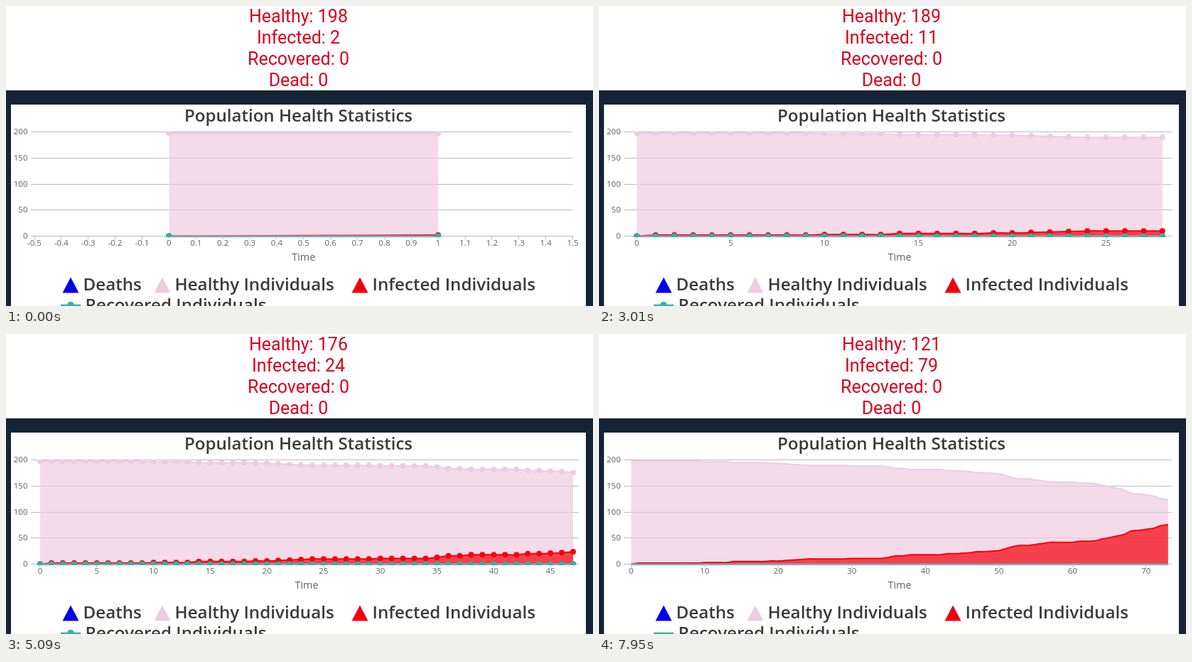
An HTML page for the animation above (8 s loop, 826 by 423 pixels).

```html
<!DOCTYPE html>
<html lang="en">
<head>
<meta charset="utf-8">
<title>Population Health Statistics</title>
<style>
  html, body { margin: 0; width: 100%; height: 100%; overflow: hidden; background: #fff; }
  svg { display: block; }
  text { font-family: "Open Sans", "Noto Sans", sans-serif; }
  .counters text { font: 25px Roboto, sans-serif; fill: #db001e; text-anchor: middle; }
  .title { font-size: 24.1px; font-weight: 600; fill: #3a3a3a; text-anchor: middle; }
  .legend text { font-size: 24.2px; font-weight: 600; fill: #3a3a3a; }
  .axis text { font-size: 11.5px; fill: #606060; text-anchor: middle; }
  .axis text.value { text-anchor: end; }
  .axis text.name { font-size: 14.4px; }
  .axis path { stroke: #bbb; fill: none; }
</style>
</head>
<body>
<svg width="826" height="423" viewBox="0 0 826 423">
  <defs><clipPath id="plot"><rect x="36" y="177" width="772" height="149"/></clipPath></defs>
  <rect y="119" width="826" height="304" fill="#162334"/>
  <rect x="7" y="139" width="809" height="284" fill="#fff"/>
  <g class="counters">
    <text id="healthy" x="411.5" y="23"></text>
    <text id="infected" x="411.5" y="53"></text>
    <text x="411.5" y="83">Recovered: 0</text>
    <text x="411.5" y="113">Dead: 0</text>
  </g>
  <text class="title" x="411.5" y="163">Population Health Statistics</text>
  <g id="chart"></g>
  <g class="legend">
    <path d="M79.5 404.5h23l-11.5-22z" fill="#0000e6"/><text x="108.5" y="401">Deaths</text>
    <path d="M208.5 404.5h23l-11.5-22z" fill="#eecce2"/><text x="237.5" y="401">Healthy Individuals</text>
    <path d="M486.5 404.5h23l-11.5-22z" fill="#f2000f"/><text x="515.5" y="401">Infected Individuals</text>
    <path d="M77 422h28" stroke="#34b0a4" stroke-width="2.5"/>
    <circle id="legendDot" cx="91" cy="422" r="5" fill="#34b0a4"/>
    <text x="111.5" y="430">Recovered Individuals</text>
  </g>
</svg>
<script>
const LOOP = 8000, TICK = 110.2, OFFSET = 25, COUNTER_LEAD = 170;
const LEFT = 40, BASE = 324.5, UNIT = 0.733;
const BLUE = '#0000e6', PINK = '#eecce2', RED = '#f8000c', TEAL = '#2fb3a6';

const repeat = (value, count) => Array(count).fill(value);
const infected = [
  0, ...repeat(2, 9), ...repeat(3, 4), ...repeat(5, 5), 6, 6, 7, 8, 9,
  ...repeat(10, 6), ...repeat(11, 5), 13, 16, 16, ...repeat(18, 5),
  20, 20, 21, 22, 24, 24, 25, 26, 30, 34, 36, 36, 38, 40, ...repeat(42, 4),
  44, 44, 45, 48, 51, 54, 57, 64, 65, 67, 69, 74, 76, 79, 79
];
const healthy = infected.map(n => Math.min(198, 200 - n));

const byId = id => document.getElementById(id);
const yOf = value => BASE - value * UNIT;

// Tick spacing: the range rounded up to 1, 2, 5 or 10, split in ten
function tickStep(range) {
  const power = 10 ** Math.floor(Math.log10(range));
  return [1, 2, 5, 10].find(n => n >= range / power) * power / 10;
}

function spline(points) {
  const at = i => points[Math.max(0, Math.min(points.length - 1, i))];
  let d = `M${points[0]}`;
  for (let i = 0; i < points.length - 1; i++) {
    const [p, a, b, q] = [at(i - 1), at(i), at(i + 1), at(i + 2)];
    const c1 = a.map((v, k) => v + (b[k] - p[k]) / 6);
    const c2 = b.map((v, k) => v - (q[k] - a[k]) / 6);
    d += `C${c1} ${c2} ${b}`;
  }
  return d;
}

const stroke = (points, color) =>
  `<path d="${spline(points)}" fill="none" stroke="${color}" stroke-width="2"/>`;

const dots = (points, color) =>
  points.map(([x, y]) => `<circle cx="${x}" cy="${y}" r="4" fill="${color}"/>`).join('');

const area = (points, color) =>
  `<path d="${spline(points)}V${BASE}H${points[0][0]}Z" fill="${color}" fill-opacity=".7"/>` +
  stroke(points, color);

function drawChart(last) {
  const step = tickStep(last);
  const labelAtEdge = step === 0.1 || step === 0.5;
  const right = labelAtEdge ? 797.5 : 806;
  const xOf = i => LEFT + (i + 0.5) * (right - LEFT) / (last + 1);
  const marked = last < 48;
  const markers = (points, color) => marked ? dots(points, color) : '';

  let grid = '', labels = '';
  for (let value = 0; value <= 200; value += 50) {
    const y = Math.floor(yOf(value)) + 0.5;
    grid += `M35 ${y}H${right}`;
    labels += `<text class="value" x="30.5" y="${y + 3.7}">${value}</text>`;
  }
  let ticks = `M${LEFT} ${BASE}H${right}`;
  const end = Math.floor((last + 0.5) / step + 1e-9);
  for (let k = Math.ceil(-0.5 / step); k <= end; k++) {
    const x = xOf(k * step);
    ticks += `M${Math.floor(x) + 0.5} 324v5`;
    labels += `<text x="${x}" y="338">${+(k * step).toFixed(1)}</text>`;
  }
  labels += `<text class="name" x="${(LEFT + right) / 2}" y="359">Time</text>`;

  const series = data => data.slice(0, last + 1).map((v, i) => [xOf(i), yOf(v)]);
  const zero = series(repeat(0, last + 1));
  const well = series(healthy), sick = series(infected);
  byId('chart').innerHTML =
    `<g class="axis"><path d="${grid}"/></g><g clip-path="url(#plot)">` +
    stroke(zero, BLUE) + markers(zero, BLUE) +
    area(well, PINK) + markers(well, PINK) +
    area(sick, RED) + markers(sick, RED) +
    stroke(zero, TEAL) +
    `</g><g class="axis"><path d="${ticks}"/></g>` +
    `<g clip-path="url(#plot)">${markers(zero, TEAL)}</g>` +
    `<g class="axis">${labels}</g>`;
  byId('legendDot').style.display = marked ? '' : 'none';
}

const indexAt = time => Math.floor((time + OFFSET) / TICK) + 1;
let shown = -1;

function render(now) {
  const time = now % LOOP;
  const last = indexAt(time);
  if (last !== shown) drawChart(shown = last);
  const sick = infected[Math.min(indexAt(time + COUNTER_LEAD), infected.length - 1)];
  byId('healthy').textContent = `Healthy: ${200 - sick}`;
  byId('infected').textContent = `Infected: ${sick}`;
}

const start = performance.now();
function frame() {
  render(performance.now() - start);
  requestAnimationFrame(frame);
}
frame();
</script>
</body>
</html>
```
